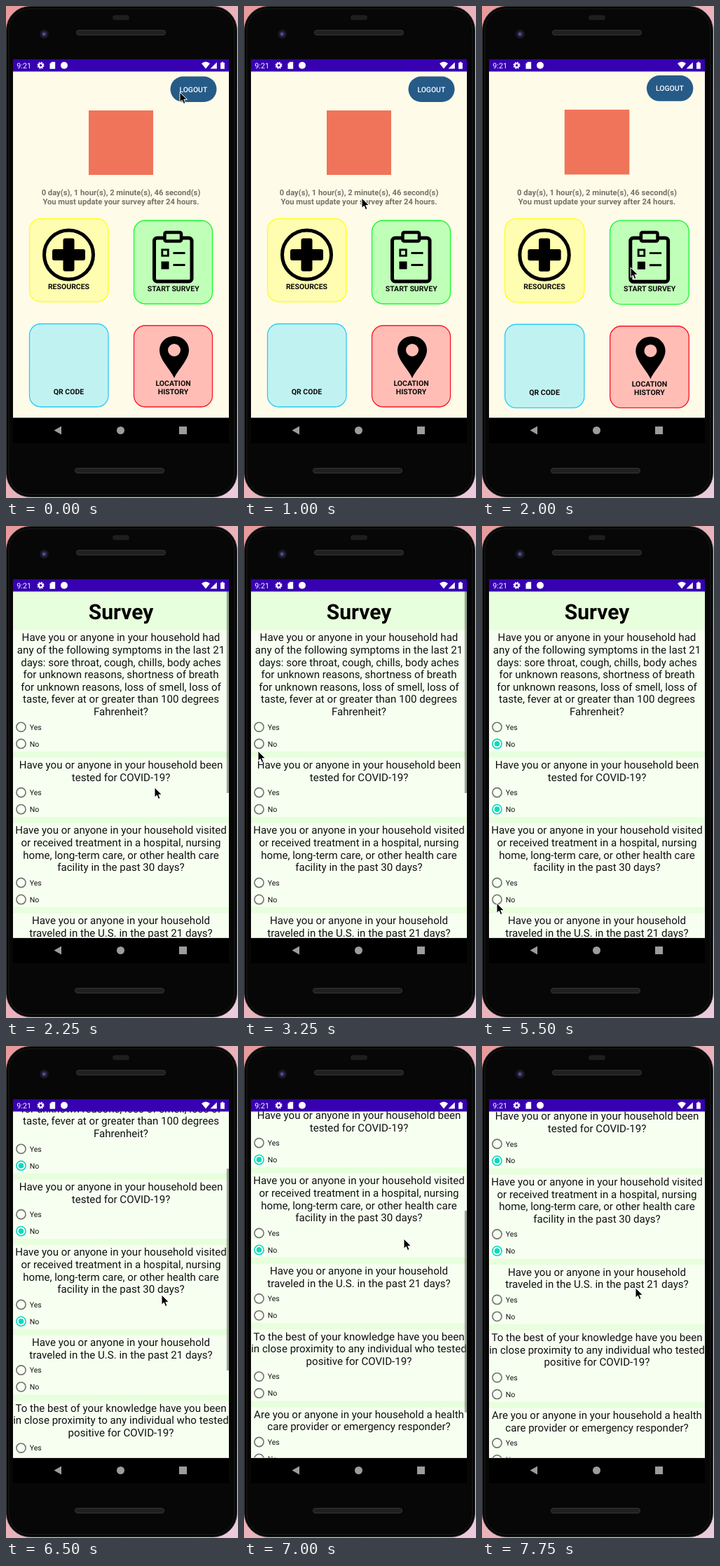
Write an HTML page that moves like this. It is 331 px wide and 702 px high and loops after 8000 ms.

```html
<!DOCTYPE html>
<html lang="en">
<head>
<meta charset="utf-8">
<title>Survey app</title>
<style>
html, body { margin: 0; width: 100%; height: 100%; overflow: hidden; background: #eeb4b4; }
svg { display: block; width: 331px; height: 702px; font-family: Roboto, sans-serif; text-rendering: geometricPrecision; }
.label { font-weight: 700; font-size: 10.5px; text-anchor: middle; fill: #0a0a0a; }
.status { font-weight: 700; font-size: 11.2px; text-anchor: middle; fill: #74726b; }
.question { font-size: 15.1px; text-anchor: middle; fill: #111; }
.answer { font-size: 10.6px; fill: #151515; }
</style>
</head>
<body>
<svg viewBox="0 0 331 702">
  <defs>
    <linearGradient id="desk" x2="1" y2="1">
      <stop offset="0" stop-color="#e89a9a"/>
      <stop offset="1" stop-color="#eccbdc"/>
    </linearGradient>
    <clipPath id="screen"><rect x="10" y="93" width="308" height="494.5"/></clipPath>
  </defs>

  <!-- phone -->
  <rect width="331" height="702" fill="url(#desk)"/>
  <rect x=".5" y=".5" width="329" height="700" rx="34" fill="#050505" stroke="#353535"/>
  <rect x="4" y="4" width="322" height="693" rx="30" fill="#070707" stroke="#1c1c1c"/>
  <rect x="152" y="13" width="24" height="7" rx="3.5" fill="#1e1e1f"/>
  <g fill="#202020" stroke="#343434">
    <rect x="100.500" y="34.500" width="127" height="7" rx="3.5"/>
    <rect x="98.500" y="659.500" width="127" height="7" rx="3.5"/>
  </g>
  <circle cx="54.500" cy="40" r="6.500" fill="#171722"/>
  <circle cx="54.500" cy="40" r="3.500" fill="#30305a"/>
  <circle cx="54" cy="40" r="1.500" fill="#6267a0"/>
  <rect x="10" y="76" width="308" height="548" fill="#000"/>

  <g clip-path="url(#screen)">
    <g id="home">
      <rect x="8" y="91" width="312" height="500" fill="#fffbe9"/>
      <rect x="234.500" y="100.500" width="66" height="36.500" rx="18.200" fill="#265b88"/>
      <text x="267.300" y="122.600" font-size="10.400" font-weight="500" text-anchor="middle" fill="#fff">LOGOUT</text>
      <rect x="118" y="149" width="92" height="92" fill="#f0745a"/>
      <text class="status" x="164" y="270">0 day(s), 1 hour(s), 2 minute(s), 46 second(s)</text>
      <text class="status" x="164" y="283">You must update your survey after 24 hours.</text>

      <g stroke-width="1.300">
        <rect x="33.500" y="303.500" width="112.500" height="118.500" rx="16" fill="#fffdaf" stroke="#ffff1c"/>
        <rect x="182.500" y="306" width="112" height="119" rx="16" fill="#c0ffb8" stroke="#14fa2c"/>
        <rect x="33.500" y="453.500" width="112.500" height="118.500" rx="16" fill="#c1f2f2" stroke="#29cbfa"/>
        <rect x="182.500" y="456" width="112" height="116" rx="16" fill="#ffbdb5" stroke="#fb1522"/>
      </g>

      <circle cx="89.500" cy="355" r="35" fill="none" stroke="#000" stroke-width="5"/>
      <path d="M89.500 339v32M73.500 355h32" fill="none" stroke="#000" stroke-width="15" stroke-linejoin="round"/>
      <rect x="66" y="347" width="47" height="16" rx="3"/>
      <rect x="81.500" y="331.500" width="16" height="47" rx="3"/>
      <text class="label" x="89.500" y="404">RESOURCES</text>

      <g fill="none" stroke="#000">
        <rect x="211.500" y="331" width="53.500" height="62" rx="4" stroke-width="5"/>
        <rect x="226.500" y="323" width="23.500" height="12.500" rx="2" fill="#c0ffb8" stroke-width="4.500"/>
        <rect x="222.800" y="347.800" width="8.500" height="8.500" stroke-width="2.800"/>
        <path d="M238.500 352.500h17M238.500 369.500h17" stroke-width="2.800"/>
      </g>
      <rect x="221.500" y="364.500" width="11" height="11"/>
      <text class="label" x="238.700" y="407">START SURVEY</text>

      <text class="label" x="89.500" y="554">QR CODE</text>

      <path fill-rule="evenodd" d="M240 531C235 519 219 505 219 491a21 20 0 0 1 42 0C261 505 245 519 240 531ZM231 491a9 9 0 1 0 18 0a9 9 0 1 0-18 0Z"/>
      <text class="label" x="238.500" y="541.700">LOCATION</text>
      <text class="label" x="238.500" y="554">HISTORY</text>
    </g>

    <g id="survey">
      <rect x="10" y="93" width="308" height="495" fill="#e7ffdc"/>
      <g id="list">
        <text x="164" y="132.500" font-size="30" font-weight="700" text-anchor="middle">Survey</text>
      </g>
      <rect id="bar" x="314.800" y="93" width="3.200" height="288" fill="#60645e" fill-opacity=".6"/>
    </g>
  </g>

  <!-- system bars -->
  <rect x="10" y="76" width="308" height="17.500" fill="#3700b0"/>
  <g fill="#fff">
    <text x="15.300" y="88.800" font-size="10.700">9:21</text>
    <circle cx="49.500" cy="84.800" r="2.700" fill="none" stroke="#fff" stroke-width="2"/>
    <circle cx="49.500" cy="84.800" r="4.200" fill="none" stroke="#fff" stroke-width="1.600" stroke-dasharray="1.900 1.400"/>
    <path d="M62.500 82.500l2.700-2.700h5v10h-7.700Z"/>
    <circle cx="83" cy="84.800" r="5"/>
    <path d="M279 82q6-5 12 0l-6 7.500Z"/>
    <path d="M291.500 89.500h9.300v-9.300Z"/>
    <path d="M306 81h1.600v-1.300h2.600V81h1.600v8.700H306Z"/>
  </g>
  <g fill="#9c9c9c">
    <path d="M68.500 605.500l10.500-6v12Z"/>
    <circle cx="163.500" cy="605.500" r="5.500"/>
    <rect x="247" y="600" width="11" height="11"/>
  </g>

  <path id="cursor" d="M0 0V14.300L3.300 11.300 5.500 16.500 8 15.400 5.800 10.400H10.400Z" stroke="#fff" stroke-width="1" stroke-linejoin="round"/>
</svg>

<script>
const $ = id => document.getElementById(id);
const STEP = 250, LOOP = 8000;

const questions = [
  ["Have you or anyone in your household had", "any of the following symptoms in the last 21",
    "days: sore throat, cough, chills, body aches", "for unknown reasons, shortness of breath",
    "for unknown reasons, loss of smell, loss of", "taste, fever at or greater than 100 degrees", "Fahrenheit?"],
  ["Have you or anyone in your household been", "tested for COVID-19?"],
  ["Have you or anyone in your household visited", "or received treatment in a hospital, nursing",
    "home, long-term care, or other health care", "facility in the past 30 days?"],
  ["Have you or anyone in your household", "traveled in the U.S. in the past 21 days?"],
  ["To the best of your knowledge have you been", "in close proximity to any individual who tested", "positive for COVID-19?"],
  ["Are you or anyone in your household a health", "care provider or emergency responder?"]
];

function add(name, attrs, text = "") {
  const node = document.createElementNS("http://www.w3.org/2000/svg", name);
  for (const key in attrs) node.setAttribute(key, attrs[key]);
  node.textContent = text;
  return $("list").appendChild(node);
}

function addRadio(y, text) {
  const ripple = add("circle", { cx: 21.5, cy: y, r: 14, fill: "#000", "fill-opacity": .12 });
  const ring = add("circle", { cx: 21.5, cy: y, r: 6.6, fill: "none", "stroke-width": 1.6 });
  const dot = add("circle", { cx: 21.5, cy: y, r: 3.8, fill: "#0bd8c3" });
  add("text", { class: "answer", x: 33.7, y: y + 3.8 }, text);
  return (on, pressed) => {
    ring.setAttribute("stroke", on ? "#0bd8c3" : "#737373");
    dot.style.display = on ? "" : "none";
    ripple.style.display = pressed ? "" : "none";
  };
}

let baseline = 164.2;
const noRadios = questions.map(lines => {
  const last = baseline + (lines.length - 1) * 17.65;
  const yes = last + 16.7, no = yes + 23.9, top = baseline - 15.5;
  add("rect", { x: 10, y: top, width: 308, height: no + 11 - top, fill: "#f7fff1" });
  lines.forEach((line, i) => add("text", { class: "question", x: 164, y: baseline + i * 17.65 }, line));
  addRadio(yes, "Yes")(false, false);
  baseline = no + 35.2;
  return addRadio(no, "No");
});

// Pointer tip, one entry per step
const pointer = [
  [248, 123], [262, 190], [286, 268], [230, 276], [168, 274], [168, 274], [176, 310], [206, 362],
  [212, 373], [212, 373], [212, 380], [190, 384], [90, 350], [20, 321], [20, 308], [20, 308],
  [21, 340], [21, 385], [21, 402], [21, 402], [21, 447], [21, 500], [21, 538], [21, 538],
  [21, 533], [205, 480], [222, 355], [226, 310], [228, 275], [227, 290], [223, 325], [219, 345]
];
const scrolls = { 25: 15, 26: 140, 27: 203, 28: 242, 29: 241.5, 30: 240.5, 31: 240.5 };
const barFade = { 14: .8, 15: .6, 16: .3, 17: 0, 25: 1, 30: .5, 31: 0 };
const chosenAt = [14, 18, 24];
const OPEN = 9;

function latest(table, step, value) {
  for (const key in table) if (key <= step) value = table[key];
  return value;
}

let shown = -1;
function draw(now) {
  const step = Math.floor(now % LOOP / STEP);
  if (step !== shown) {
    shown = step;
    const scroll = latest(scrolls, step, 0);
    const zoom = step === OPEN - 1 ? 1.006 : 1;
    $("home").setAttribute("transform", `translate(164 331) scale(${zoom}) translate(-164 -331)`);
    $("survey").style.display = step < OPEN ? "none" : "";
    $("list").setAttribute("transform", `translate(0 ${-scroll})`);
    $("bar").setAttribute("y", 93 + scroll * .586);
    $("bar").style.opacity = latest(barFade, step, 1);
    $("cursor").setAttribute("transform", `translate(${pointer[step]})`);
    noRadios.forEach((set, i) => {
      const age = step - chosenAt[i];
      set(age >= 0, age === 0 || age === 1);
    });
  }
  requestAnimationFrame(draw);
}
const start = performance.now();
requestAnimationFrame(() => draw(0));
draw = (paint => () => paint(performance.now() - start))(draw);
</script>
</body>
</html>
```
